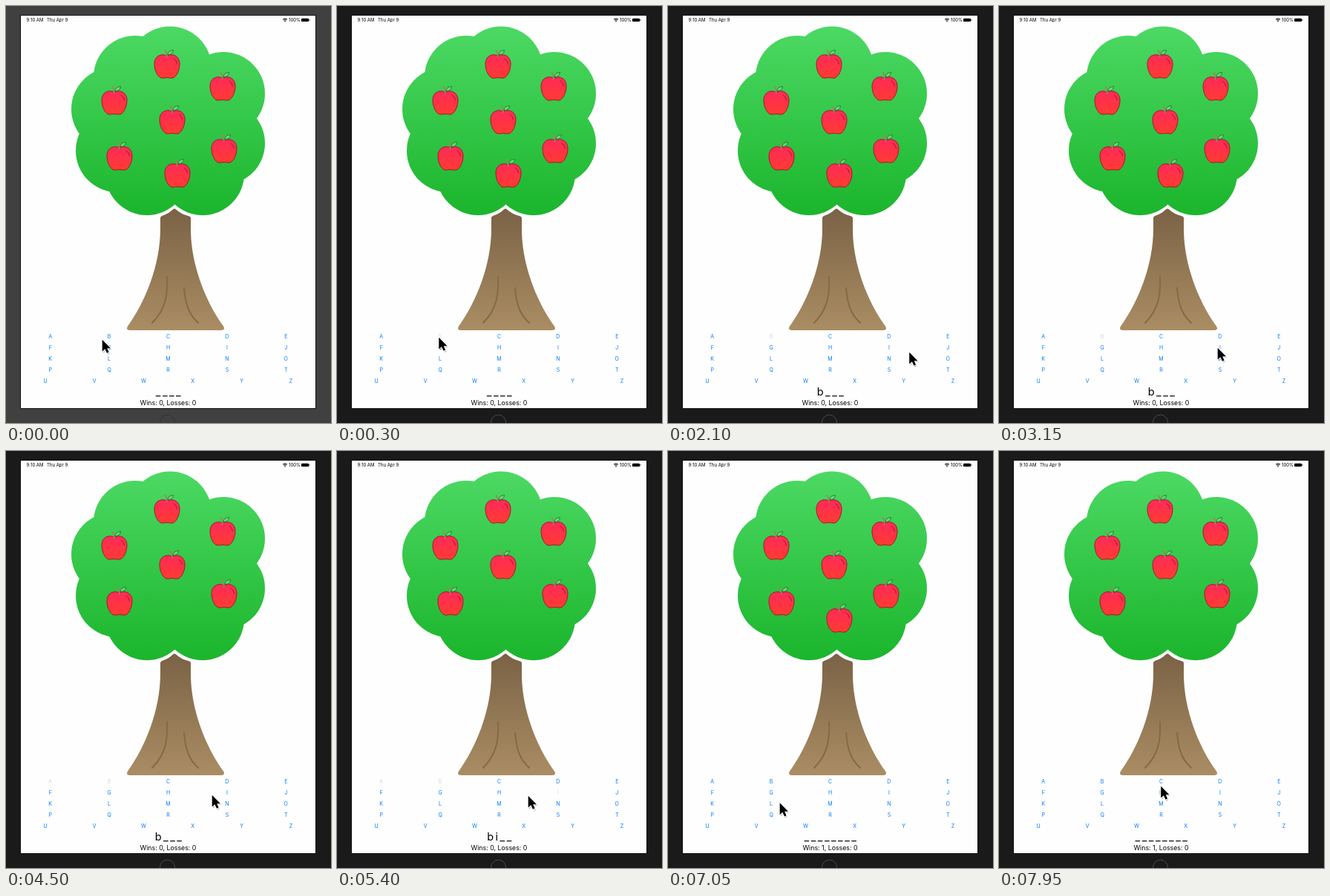
Animation of 438 by 562 pixels, one loop 8000 ms. Source, as an HTML page:

```html
<!DOCTYPE html>
<html lang="en">
<head>
<meta charset="utf-8">
<title>Word game</title>
<style>
html, body { margin: 0; width: 100%; height: 100%; overflow: hidden; }
svg { display: block; width: 438px; height: 562px; font-family: Inter, Roboto, sans-serif; }
#keys text { font-size: 7px; text-anchor: middle; fill: #007aff; }
#word { font-size: 14.5px; letter-spacing: 2.5px; text-anchor: middle; }
#score { font-size: 8.8px; text-anchor: middle; }
.status { font-size: 6px; }
</style>
</head>
<body>
<svg viewBox="0 0 438 562">
  <defs>
    <linearGradient id="green" gradientUnits="userSpaceOnUse" x1="0" y1="27" x2="0" y2="283">
      <stop stop-color="#4cd964"/><stop offset="1" stop-color="#1bb52c"/>
    </linearGradient>
    <linearGradient id="brown" x2="0" y2="1">
      <stop stop-color="#7a6245"/><stop offset="1" stop-color="#aa8d63"/>
    </linearGradient>
    <linearGradient id="red" x2="0" y2="1">
      <stop stop-color="#ff2a5a"/><stop offset="1" stop-color="#ff3b30"/>
    </linearGradient>
    <g id="apple" fill="none" stroke-linecap="round">
      <path d="M0-13.500C3-15.500 7-16 11-14C15-12 17-8 17-3C17 6 13 13 9 15.500C6 17 3 15.500 0 15.500C-3 15.500-6 17-9 15.500C-13 13-17 6-17-3C-17-8-15-12-11-14C-7-16-3-15.500 0-13.500Z" fill="url(#red)" stroke="#a3172c"/>
      <path d="M9-10Q13-8 13.500-3" stroke="#a3172c"/>
      <path d="M-2.500-21Q0-18-.3-12.500" stroke="#a5835a" stroke-width="1.800"/>
      <path d="M1-15.500Q1-21 8.500-21.500Q8-15 1-15.500Z" fill="#6fd67c" stroke="#1a7a2c" stroke-width=".9"/>
    </g>
  </defs>
  <rect id="bezel" width="438" height="562"/>
  <circle id="home" cx="217.500" cy="561" r="10" fill="none"/>
  <rect x="19.500" y="12.500" width="398" height="530" fill="#fefefe" stroke="#111"/>

  <text class="status" x="27.500" y="21">9:10 AM</text>
  <text class="status" x="55" y="21">Thu Apr 9</text>
  <text class="status" x="381" y="21">100%</text>
  <path d="M373 18Q376 15.700 379 18M374.200 19.300Q376 17.900 377.800 19.300" fill="none" stroke="#000"/>
  <circle cx="376" cy="20.700" r=".8"/>
  <rect x="398" y="16.700" width="10" height="4.400" rx="1.200"/>
  <rect x="408.500" y="18" width=".8" height="1.800"/>

  <g id="crown" fill="url(#green)"><rect x="145" y="85" width="150" height="145"/></g>
  <path d="M208 286Q208 283.500 211 282.500Q219 280 224.500 274.500Q227 272 229.500 274.500Q236 280.500 246 283Q249 283.700 249 286V300C249 350 270 400 293 431.500Q296 437 290 437H167Q161 437 164 431.500C187 400 208 350 208 300Z" fill="url(#brown)"/>
  <path d="M217 365C218 390 215 409 197 427M240 380C242 404 247 416 259 427" fill="none" stroke="#846a48" stroke-width="2" stroke-linecap="round"/>
  <g id="apples"></g>
  <g id="keys"></g>
  <text id="word" x="220" y="524.500"></text>
  <text id="score" x="218.500" y="538"></text>
  <g id="cursor">
    <path d="M2 3V19L5.500 15.500L8 21L11 19.700L8.500 14H13.500Z" opacity=".22"/>
    <path d="M.7.7V16.500L4.400 13.200L7 18.800L9.600 17.600L7.200 12.200H12Z" stroke="#fff" stroke-width="2" paint-order="stroke"/>
  </g>
</svg>
<script>
const LOOP = 8000, STEP = 150, WIN = 6750, MOVE = 600;
const $ = id => document.getElementById(id);

function add(parent, tag, attrs, text = '') {
  const el = document.createElementNS('http://www.w3.org/2000/svg', tag);
  for (const k in attrs) el.setAttribute(k, attrs[k]);
  el.textContent = text;
  return $(parent).appendChild(el);
}

for (const [cx, cy] of [[221, 83.5], [174, 96], [293, 118], [144, 139], [293, 185], [150, 195], [190, 226], [265, 226]])
  add('crown', 'circle', { cx, cy, r: 56 });

const apples = [[217, 81], [292, 111], [146, 130], [224, 156], [153, 205], [294, 195], [231, 228]]
  .map(([x, y]) => add('apples', 'use', { href: '#apple', x, y }));
const lastApple = apples[6];

// Four rows of five letters, then one row of six
const keys = {};
[...'ABCDEFGHIJKLMNOPQRSTUVWXYZ'].forEach((c, i) => {
  const row = Math.min(4, Math.floor(i / 5)), n = row === 4 ? 6 : 5;
  const x = 20 + 397 * (i - row * 5 + 0.5) / n, y = 447.7 + row * 15;
  keys[c] = { x, y, el: add('keys', 'text', { x, y }, c) };
});

const presses = { B: 300, A: 3750, I: 4800, L: 6600, C: 7800 };

// Pointer stops [time, x, y]: each pressed key, and places visited in between
const stops = [
  [0, 129, 449], [1350, 40, 454], [1800, 237, 463], [2100, 324.5, 466], [2700, 294, 460], [3150, 294, 460],
  [3300, 118, 431], [4200, 235, 458], [4500, 277, 463], [5400, 257, 464], [6150, 144.5, 481],
  [7500, 222, 461], [7950, 217.5, 451],
  ...Object.entries(presses).map(([c, t]) => [t, keys[c].x - 2.5, keys[c].y - 1.7])
].sort((a, b) => a[0] - b[0]);

// Rest at a stop, then ease to the next one in at most MOVE ms
function pointer(t) {
  const i = stops.findIndex(s => s[0] > t);
  if (i < 0) return stops.at(-1).slice(1);
  const [t0, x0, y0] = stops[i - 1], [t1, x1, y1] = stops[i];
  const start = Math.max(t0, t1 - MOVE);
  const k = Math.max(0, (t - start) / (t1 - start)), e = k * k * (3 - 2 * k);
  return [x0 + (x1 - x0) * e, y0 + (y1 - y0) * e];
}

function draw(t) {
  const active = t >= 150, won = t >= WIN;
  $('bezel').setAttribute('fill', active ? '#1a1a1a' : '#404040');
  $('home').setAttribute('stroke', active ? '#4a4a4a' : '#303030');

  for (const c in presses) {
    const since = t - presses[c], { style } = keys[c].el;
    style.fill = since >= STEP && !won ? '#d6d6d6' : '#007aff';
    style.opacity = since >= 0 && since < STEP ? 0.2 : 1;
  }

  const released = c => t >= presses[c] + STEP;
  $('word').textContent = won ? '________' : released('I') ? 'bi__' : released('B') ? 'b___' : '____';
  $('score').textContent = `Wins: ${won ? 1 : 0}, Losses: 0`;
  lastApple.style.display = released(won ? 'C' : 'A') ? 'none' : '';
  $('cursor').setAttribute('transform', `translate(${pointer(t)})`);
}

function tick() {
  const t = performance.now() % LOOP;
  draw(Math.floor(t / STEP) * STEP);
  requestAnimationFrame(tick);
}
tick();
</script>
</body>
</html>
```
